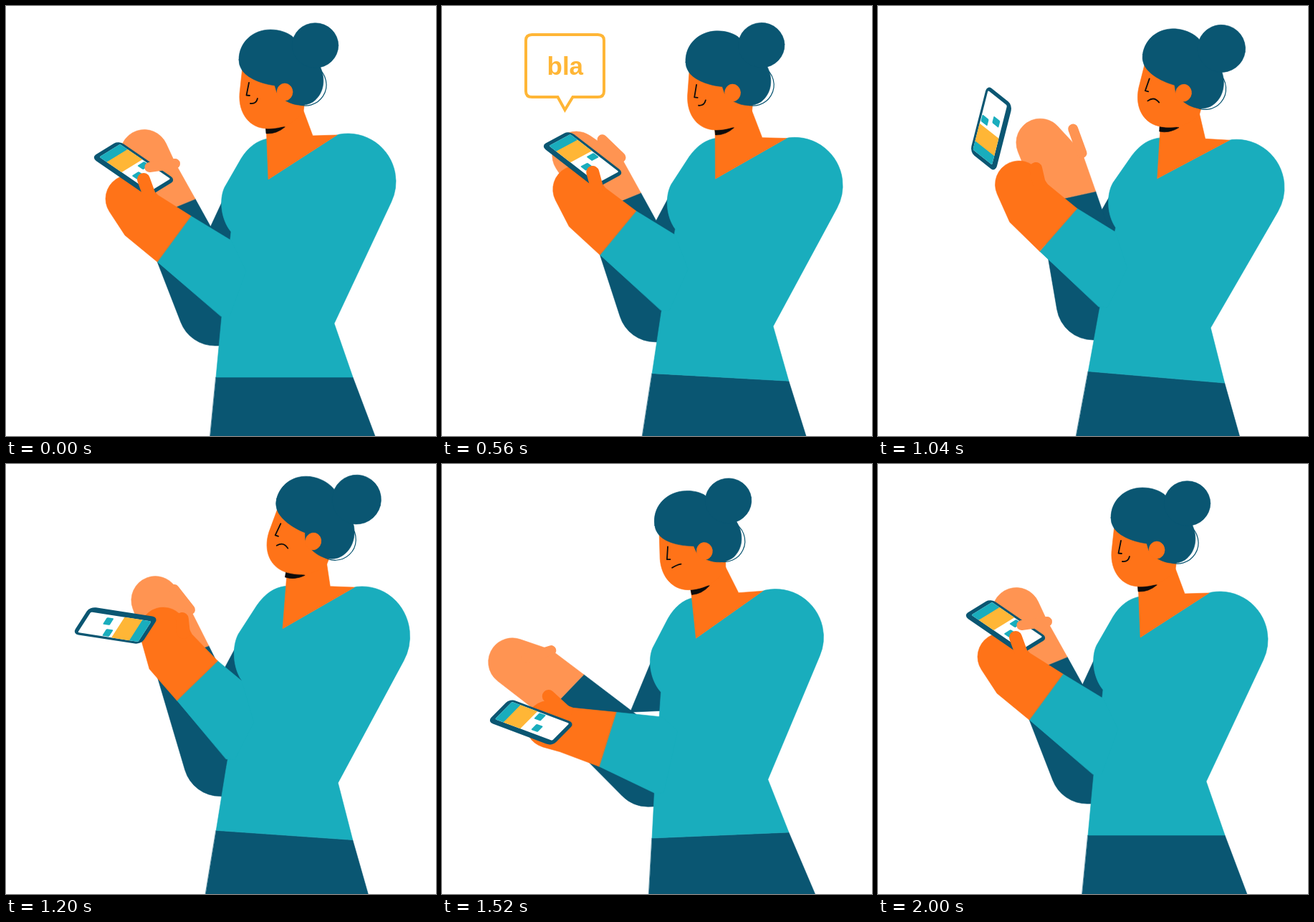
Animation, 600 px wide and 600 px high, one loop 2.04 s. Source, as an HTML page with a canvas:

```html
<!DOCTYPE html>
<html lang="en">
<head>
<meta charset="utf-8">
<title>Chatting on the phone</title>
<style>
html, body { margin: 0; width: 100%; height: 100%; overflow: hidden; background: #fff; }
canvas { display: block; width: 600px; height: 600px; }
</style>
</head>
<body>
<canvas id="stage" width="600" height="600"></canvas>
<script>
const ctx = document.getElementById('stage').getContext('2d');
const SKIN = '#ff7318', PALE = '#ff9452', TEAL = '#19adbd', NAVY = '#0a5672', AMBER = '#ffb636', INK = '#0c0c0c';
const LOOP = 2040, STEP = 40, RAD = Math.PI / 180;

const clamp = (v, a, b) => Math.min(b, Math.max(a, v));
const ramp = (t, a, b) => clamp((t - a) / (b - a), 0, 1);
const mix = (a, b, u) => a + (b - a) * u;
const hop = (t, peak, half, height) => height * Math.cos(clamp((t - peak) / half, -1, 1) * Math.PI / 2) ** 2;

// Smooth curve through key poses that comes to rest at every turning point.
function tween(times, rows) {
  const slope = (i, k) => (rows[i + 1][k] - rows[i][k]) / (times[i + 1] - times[i]);
  const speed = (i, k) => {
    if (!i || i === rows.length - 1) return 0;
    const a = slope(i - 1, k), b = slope(i, k);
    return a * b > 0 ? (a + b) / 2 : 0;
  };
  return t => {
    let i = 0;
    while (i < times.length - 2 && t >= times[i + 1]) i++;
    const d = times[i + 1] - times[i], u = (t - times[i]) / d, w = 1 - u;
    return rows[i].map((a, k) =>
      a * w * w * (1 + 2 * u) + rows[i + 1][k] * u * u * (3 - 2 * u) +
      d * (speed(i, k) * u * w * w - speed(i + 1, k) * u * u * w));
  };
}

// Six key poses; the last one is overshot first, then all returns to the start.
function pose(...rows) {
  const last = rows.pop(), over = last.map((v, k) => v + 0.3 * (v - rows[0][k]));
  return tween([0, 240, 560, 1040, 1360, 1600, 1720, 2000], [...rows, over, last, rows[0]]);
}

const REST = [0, 0, 0];
const posture = pose([0, 0], [1.5, 0], [3.2, -2], [4.9, 8], [1.8, 18], [-2.7, -13]); // lean, head tilt
const nearArm = pose(REST, REST, REST, REST, [36, -9, 11], [-5, 57, -20]);           // shift, turn
const farArm = pose(                                     // shift, turn, hand turn, thumb direction
  [0, 0, 0, 0, 172], [0, 0, 0, -19, 206], [0, 0, -3, -18, 224],
  [17, -4, 5, -8, 250], [-25, 16, -12, -9, 200], [-40, 27, -18, -29, 158]);

function poly(points) {
  const p = new Path2D();
  points.forEach(([x, y]) => p.lineTo(x, y));
  p.closePath();
  return p;
}
function fill(color, path) {
  ctx.fillStyle = ctx.strokeStyle = color;
  ctx.lineWidth = .6;
  ctx.fill(path);
  ctx.stroke(path);
}
function line(color, width, path) {
  ctx.strokeStyle = color;
  ctx.lineWidth = width;
  ctx.stroke(path);
}
const shape = (color, d) => fill(color, new Path2D(d));
function disc(color, x, y, rx, ry = rx) {
  const p = new Path2D();
  p.ellipse(x, y, rx, ry, 0, 0, 7);
  fill(color, p);
}
const finger = (color, width, from, to) => line(color, width, poly([from, to]));

// Angle at which a line from (px, py) touches a circle.
function touch(x, y, r, px, py, side) {
  return Math.atan2(py - y, px - x) + side * Math.acos(Math.min(1, r / Math.hypot(px - x, py - y)));
}
function hand(color, low, knuckle, [x, y], r, joint, high) {
  const p = new Path2D();
  p.moveTo(...low);
  p.lineTo(...knuckle);
  p.arc(x, y, r, touch(x, y, r, ...knuckle, 1), touch(x, y, r, ...joint, -1));
  p.lineTo(...joint);
  p.lineTo(...high);
  p.closePath();
  fill(color, p);
}

// Moves the rest position so that its pivot lies at (x, y), turned by an angle.
function placer([px, py], [x, y], angle, sy = 1) {
  const m = new DOMMatrix().translate(x, y).rotate(angle).scale(1, sy).translate(-px, -py);
  return {
    at(qx, qy) { const p = m.transformPoint({ x: qx, y: qy }); return [p.x, p.y]; },
    draw(fn) { ctx.save(); ctx.transform(m.a, m.b, m.c, m.d, m.e, m.f); fn(); ctx.restore(); }
  };
}

const HIP = [389, 518], NECK = [395, 183], NEAR_CUFF = [234.5, 325], FAR_CUFF = [226.5, 284.5];

function rig(t) {
  const [lean, tilt] = posture(t);
  const body = placer(HIP, HIP, lean, 1 + hop(t, 280, 280, .025) + hop(t, 1260, 240, .048));
  const joint = (cuff, dx, dy) => { const [x, y] = body.at(...cuff); return [x + dx, y + dy]; };
  const [nx, ny, nTurn] = nearArm(t), [fx, fy, fTurn, fHand, thumb] = farArm(t);
  const near = joint(NEAR_CUFF, nx, ny), far = joint(FAR_CUFF, fx, fy), turn = lean + nTurn;
  return {
    body, tilt, turn, thumb,
    head: placer(NECK, body.at(...NECK), tilt),
    cuff: placer(NEAR_CUFF, near, turn),
    fist: placer(NEAR_CUFF, near, turn * 1.45),
    farTurn: lean + fTurn,
    farCuff: placer(FAR_CUFF, far, lean + fTurn),
    farFist: placer(FAR_CUFF, far, lean + fHand)
  };
}

// The phone rests on the near fist, apart from one backward flip.
function grip(t, spin = 0) {
  const { fist, turn } = rig(t), [x, y] = fist.at(172, 269), a = turn * RAD;
  return [x + 6 * Math.cos(a) + 42 * Math.sin(a), y + 6 * Math.sin(a) - 42 * Math.cos(a), 34.5 + turn - spin];
}
const flip = tween([820, 1040, 1360, 1600], [grip(820), [158, 171, -75.7], [150, 307.5, -261.5], grip(1600, 360)]);
const phonePose = t => t > 820 && t < 1600 ? flip(t) : grip(t);

function drawTorso() {
  shape(NAVY, 'M293 518H484L530 640H281Z');
  const p = new Path2D('M366 242L462 180');
  p.arc(477, 245, 67, -100 * RAD, touch(477, 245, 67, 458, 443, -1));
  p.lineTo(458, 443);
  p.lineTo(484, 518);
  p.lineTo(293, 518);
  p.lineTo(301, 433);
  p.lineTo(314, 315);
  p.bezierCurveTo(300, 298, 297, 270, 305, 253);
  p.lineTo(328, 213);
  p.bezierCurveTo(338, 197, 350, 188, 365, 185);
  p.lineTo(375, 184);
  p.closePath();
  fill(TEAL, p);
}

function drawHead(tilt, frown) {
  const swell = Math.max(0, tilt);
  shape(INK, 'M362 166L363 178Q377 179 389 169Z');
  shape(SKIN, 'M330 85L326 122C324 150 340 171 365 171C385 171 402 165 415 147L420 110L400 80Z');
  const ring = new Path2D();
  ring.arc(418, 110, 29, -1, 2);
  line(NAVY, 1.2, ring);
  shape(NAVY, 'M325 75C325 50 345 33 369 33C382 33 392 37 399 42L438 84C446 100 445 122 428 134' +
    'C416 141 402 139 390 132L378 121L375 111C352 108 333 98 328 87Q325 82 325 75Z');
  disc(NAVY, 431.5 + swell * .15, 55 - swell * .45, 32.3 + swell * .13, 31.3 + swell * .22);
  disc(SKIN, 389, 120, 11, 12);
  line(INK, 1.8, new Path2D('M339 107L335.500 124.500L340 125'));
  line(INK, 1.8, new Path2D(`M341 ${mix(136, 138, frown)}Q349 ${mix(137, 130, frown)} ` +
    `${mix(351, 357, frown)} ${mix(129, 138, frown)}`));
}

function drawPhone([x, y, angle]) {
  const box = (color, bx, by, w, h, r = 0) => {
    ctx.fillStyle = color;
    ctx.beginPath();
    ctx.roundRect(bx, by, w, h, r);
    ctx.fill();
  };
  const skew = 114 * RAD;
  ctx.save();
  ctx.translate(x, y);
  ctx.rotate(angle * RAD);
  ctx.transform(.97, 0, Math.cos(skew) * .87, Math.sin(skew) * .87, 0, 0);
  ctx.translate(-50, -26);
  box(NAVY, 0, 0, 100, 52, 9);
  box('#fff', 6, 4, 88, 39, 2);
  box(TEAL, 6, 4, 14, 39, 2);
  box(AMBER, 19, 4, 26, 39);
  box(TEAL, 49, 5, 10, 13, 1.5);
  box(TEAL, 58, 25, 10, 13, 1.5);
  ctx.restore();
}

function drawBubble(t) {
  const size = ramp(t, 80, 240) * (1 - ramp(t, 640, 760));
  if (!size) return;
  const grow = ramp(t, 240, 480);
  ctx.save();
  ctx.translate(171.5, mix(141, 146, grow));
  ctx.rotate(mix(-.7, 0, grow) * RAD);
  ctx.scale(size * mix(.93, 1, grow), size);
  line(AMBER, 4, new Path2D('M-10-19H-46Q-54.500-19-54.500-27V-98Q-54.500-106-46-106H46Q54.500-106 54.500-98' +
    'V-27Q54.500-19 46-19H11L0-1Z'));
  const letters = clamp(Math.floor((t - 40) / 120), 0, 3);
  ctx.fillStyle = AMBER;
  ctx.font = `bold ${mix(23, 35, ramp(t, 240, 400))}px "Liberation Sans", Arial, sans-serif`;
  ctx.fillText('bla'.slice(0, letters), mix(-22, -25, grow), mix(-45, -50, grow));
  ctx.restore();
}

function drawFarArm({ body, farTurn, farCuff, farFist }) {
  const low = farCuff.at(189, 300), high = farCuff.at(264, 269), slant = (61 + farTurn) * RAD;
  const [ex, ey] = body.at(291.5, 423), r = 51;
  fill(NAVY, poly([body.at(303, 270), body.at(270, 341), body.at(340, 341)]));
  const p = new Path2D();
  p.moveTo(...high);
  p.lineTo(high[0] + 150 * Math.cos(slant), high[1] + 150 * Math.sin(slant));
  p.lineTo(...body.at(330, 474));
  p.arc(ex, ey, r, Math.PI / 2, touch(ex, ey, r, ...low, -1));
  p.lineTo(...low);
  p.closePath();
  fill(NAVY, p);
  hand(PALE, low, low, farFist.at(193, 206), 33.5, farCuff.at(236, 219), high);
}

function drawNearArm({ body, cuff, fist, turn }) {
  const low = cuff.at(211, 357), high = cuff.at(258, 293), drop = -1.2 * turn;
  fill(TEAL, poly([low, high, body.at(314, 327 + drop), body.at(335, 370), body.at(312, 433 + drop), body.at(300, 433 + drop)]));
  hand(SKIN, low, cuff.at(166, 320), fist.at(172, 269), 33, fist.at(212, 264), high);
}

function draw(t) {
  ctx.fillStyle = '#fff';
  ctx.fillRect(0, 0, 600, 600);
  ctx.lineCap = ctx.lineJoin = 'round';

  const pose = rig(t), { body, head, fist, farCuff, tilt, turn, thumb } = pose;
  const [jx, jy] = farCuff.at(236, 220), thumbOnTop = thumb < 180;
  const farThumb = () => finger(PALE, 14, [jx, jy],
    [jx + 36 * Math.cos(thumb * RAD), jy + 36 * Math.sin(thumb * RAD)]);

  drawFarArm(pose);
  if (!thumbOnTop) farThumb();
  body.draw(drawTorso);
  fill(SKIN, poly([head.at(363, 165), body.at(366, 242), body.at(462, 180), body.at(428, 181), head.at(415, 146)]));
  head.draw(() => drawHead(tilt, ramp(t, 720, 900) * (1 - ramp(t, 1440, 1600))));
  drawNearArm(pose);

  drawPhone(phonePose(t));
  if (thumbOnTop) farThumb();
  const reach = 1 - .02 * turn;
  finger(SKIN, 18, fist.at(200, 264), fist.at(200 - 8 * reach, 264 - 22 * reach));
  ctx.lineJoin = 'miter';
  drawBubble(t);
}

const start = performance.now();
function tick() {
  const t = (performance.now() - start) % LOOP;
  draw(Math.floor(t / STEP) * STEP);
  requestAnimationFrame(tick);
}
tick();
</script>
</body>
</html>
```
